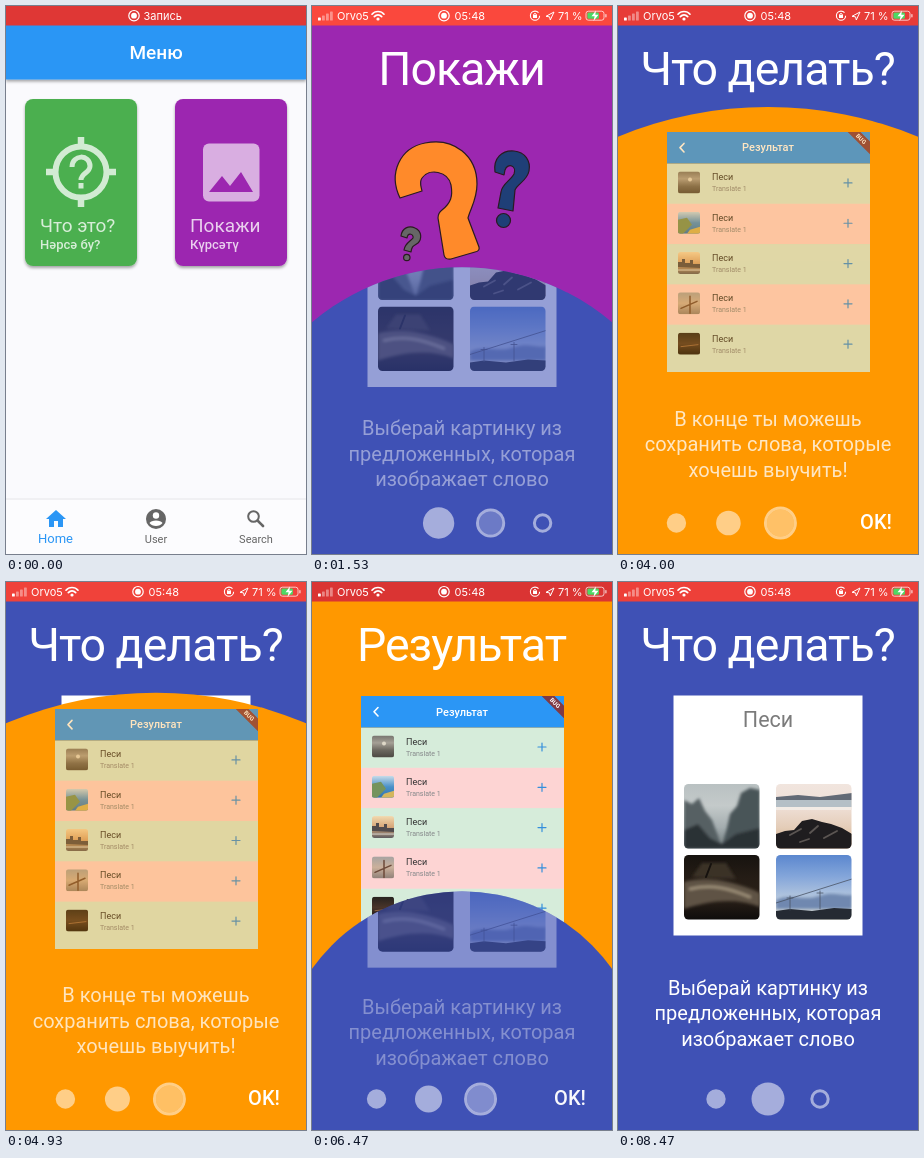
An HTML page for the animation above (8540 ms loop, 300x548 px).

```html
<!DOCTYPE html>
<html lang="ru">
<head>
<meta charset="utf-8">
<title>Меню</title>
<style>
html, body { margin: 0; width: 100%; height: 100%; overflow: hidden; background: #fafafd; }
svg { display: block; width: 300px; height: 548px; }
text { font-family: Roboto, "Noto Sans", sans-serif; }
.mid { text-anchor: middle; }
.status text { font: 11px Inter, "Noto Sans", sans-serif; fill: #fff; }
.title { font-size: 46.5px; letter-spacing: -1px; fill: #fff; text-anchor: middle; }
.body { font-size: 20px; fill: #fff; text-anchor: middle; }
.line { fill: none; stroke-linecap: round; stroke-linejoin: round; }
</style>
</head>
<body>
<svg viewBox="0 0 300 548">
  <defs>
    <clipPath id="reveal"><circle id="hole" cx="150" cy="493.2"/></clipPath>
    <clipPath id="photo"><rect width="75.5" height="64.5" rx="4.5"/></clipPath>
    <clipPath id="thumb"><rect width="22" height="22" rx="2.5"/></clipPath>
    <clipPath id="card"><rect x="49" y="114" width="203" height="240"/></clipPath>
    <filter id="shadow" x="-20%" y="-20%" width="140%" height="150%">
      <feDropShadow dx="0" dy="2" stdDeviation="1.6" flood-opacity=".35"/>
    </filter>
    <filter id="soft"><feGaussianBlur stdDeviation="1.6"/></filter>
  </defs>
  <g id="menu"></g>
  <g id="intro">
    <g id="pages"></g>
    <g id="dots"></g>
    <text id="ok" class="mid" x="258" y="523" font-size="20" font-weight="500" fill="#fff">OK!</text>
  </g>
  <g class="status">
    <rect id="bar" width="300" height="19.5"/>
    <g id="recording"></g>
    <g id="clock"></g>
  </g>
</svg>
<script>
const LOOP = 8540;
const $ = id => document.getElementById(id);

const rect = (x, y, w, h, fill, extra = '') =>
  `<rect x="${x}" y="${y}" width="${w}" height="${h}" fill="${fill}" ${extra}/>`;
const circle = (x, y, r, fill, extra = '') =>
  `<circle cx="${x}" cy="${y}" r="${r}" fill="${fill}" ${extra}/>`;
const shape = (d, fill, extra = '') => `<path d="${d}" fill="${fill}" ${extra}/>`;
const line = (d, color, width, extra = '') =>
  `<path class="line" d="${d}" stroke="${color}" stroke-width="${width}" ${extra}/>`;
const text = (x, y, size, fill, str, extra = '') =>
  `<text x="${x}" y="${y}" font-size="${size}" fill="${fill}" ${extra}>${str}</text>`;
const soft = art => `<g filter="url(#soft)">${art}</g>`;

let gradients = 0;
// Vertical gradient box, colours spread evenly
function sky(w, h, ...colors) {
  const id = 'sky' + gradients++;
  const stops = colors.map((c, i) =>
    `<stop offset="${i / (colors.length - 1)}" stop-color="${c}"/>`).join('');
  return `<linearGradient id="${id}" x2="0" y2="1">${stops}</linearGradient>` +
    rect(0, 0, w, h, `url(#${id})`);
}
const framed = (clip, x, y, art) =>
  `<g transform="translate(${x} ${y})" clip-path="url(#${clip})">${art}</g>`;

// Menu screen
function drawMenu() {
  const pale = 'rgba(255,255,255,.78)';
  const tile = (x, color, top, sub) =>
    rect(x, 93, 112, 167, color, 'rx="8" filter="url(#shadow)"') +
    text(x + 15, 226, 19, pale, top) +
    text(x + 15, 243, 13, pale, sub, 'font-weight="500"');
  const mint = '#d2ebd3';
  const target = circle(75, 166, 25.5, 'none', `stroke="${mint}" stroke-width="6"`) +
    shape('M75 131V142M75 190V201M40 166H51M99 166H110', 'none', `stroke="${mint}" stroke-width="6.5"`) +
    shape('M66 161C66 148 84 148 84 160C84 167 75 167 75 174', 'none', `stroke="${mint}" stroke-width="5"`) +
    rect(72.5, 177, 5, 5.5, mint);
  const picture = rect(197, 137.5, 56.5, 58, '#d9aee1', 'rx="6"') +
    shape('M203 186L216 170L224 180L235 166L247 186Z', '#9c27b0');
  const grey = '#666';
  return rect(0, 0, 300, 548, '#fafafd') +
    rect(0, 10, 300, 63.5, '#2b96f5', 'filter="url(#shadow)"') +
    text(150, 53, 19, '#fff', 'Меню', 'class="mid" font-weight="500"') +
    tile(19, '#4caf50', 'Что это?', 'Нәрсә бу?') + target +
    tile(169, '#9c27b0', 'Покажи', 'Күрсәтү') + picture +
    rect(0, 492, 300, 2, '#f0f0f3') + rect(0, 494, 300, 54, '#fcfcfe') +
    shape('M50 504L40 513H43V521H48V515H52V521H57V513H60Z', '#2b96f5') +
    text(49.5, 537, 13, '#2b96f5', 'Home', 'class="mid"') +
    circle(150, 513, 10, grey) + circle(150, 509.5, 3.2, '#fff') +
    shape('M143.5 517C145 513.5 155 513.5 156.5 517C154 521 146 521 143.5 517Z', '#fff') +
    text(150, 537, 11, grey, 'User', 'class="mid"') +
    circle(247.5, 510.5, 5.3, 'none', `stroke="${grey}" stroke-width="2"`) +
    line('M252 515L257 520', grey, 2.6) +
    text(250, 537, 11, grey, 'Search', 'class="mid"');
}

// Intro pictures
function marks() {
  const mark = (d, x, y, r, color) => {
    const edge = 'stroke="#2a1a20" stroke-width="1.2" stroke-linejoin="round"';
    return shape(d, color, edge) + circle(x, y, r, color, edge);
  };
  return mark('M88 192C76 167 88 142 113 137C142 131 165 150 165 178C165 194 158 203 156 212' +
      'L167 241Q168 245 163 246L139 253Q133 254 132 249L126 212Q126 207 130 204' +
      'C139 197 141 190 139 179C136 165 117 162 110 172C107 176 109 180 110 185Z',
      153, 281, 15, '#ff8a2a') +
    mark('M183 166C181 152 190 144 202 145C213 146 219 155 217 165C215 175 205 178 203 184' +
      'L201 205L186 202L189 186C190 178 199 174 202 168C205 160 196 156 193 164L192 169Z',
      191.5, 214.5, 7, '#1f3f77') +
    mark('M89 230C90 222 97 219 103 222C110 225 110 233 106 237C102 240 100 239 99 246' +
      'L92 244C93 237 99 235 101 232C102 228 96 226 95 232Z',
      94.8, 251.5, 3.2, '#666');
}

function quiz() {
  const w = 76, h = 65;
  const fog = sky(w, h, '#b9c1c2', '#c4caca', '#a4adaf', '#6d777a') +
    soft(shape('M0 16L8 20L15 14L21 27L28 36L34 52L38 65H0Z', '#566064') +
      shape('M76 6L66 4L57 9L53 22L46 30L43 44L37 65H76Z', '#4a5458') +
      shape('M0 46L14 40L26 54L38 60L52 50L76 44V65H0Z', '#2b3236'));
  const beach = sky(w, h, '#f1e5de', '#efe0d8', '#e4cdb8', '#d3ad8c') +
    shape('M0 13L22 11L44 13L76 9V16H0Z', '#626a76') +
    rect(0, 16, w, 7, '#b4bfc6') + rect(0, 23, w, 3, '#f2ebe5') +
    shape('M0 50L9 47L18 46L26 37L36 35L46 38L55 40L66 44L76 50V65H0Z', '#1f1d1f') +
    line('M14 51L25 45M34 49L42 42M48 54L61 47M24 58L33 55', '#5b5552', 1.8);
  const car = sky(w, h, '#17130f', '#241c15', '#2a2018', '#0e0c0b') +
    soft(shape('M0 27C20 21 48 25 76 38V52C52 42 24 46 0 54Z', '#5e5244') +
      shape('M8 22L18 8H42L52 24Z', '#3a3027') + line('M6 34C28 29 44 33 66 42', '#a3947d', 2.5)) +
    line('M22 22L27 9', '#15110e', 2);
  const dusk = sky(w, h, '#5b87cf', '#84a6da', '#b5c7de', '#dcd8c8') +
    soft(shape('M0 45C15 38 28 46 43 41S64 41 76 40V54H0Z', '#7088b0')) +
    shape('M0 56L14 54L36 56L58 53L76 54V65H0Z', '#252a33') +
    line('M14 55V41M44 54V36M11 43H17M41 38H47M0 48L76 24', '#4a5365', .8);
  return rect(55.5, 113.5, 189, 240, '#fff') +
    text(150, 144.5, 21.5, '#7b7b7b', 'Песи', 'class="mid"') +
    framed('photo', 66, 202, fog) + framed('photo', 158, 202, beach) +
    framed('photo', 66, 273, car) + framed('photo', 158, 273, dusk);
}

function results() {
  const thumbs = [
    sky(22, 22, '#77756f', '#a5a096', '#6b675f', '#4b4842') + circle(12, 8, 2, '#ded8c8'),
    sky(22, 22, '#c7dce9', '#4a91c9', '#2f73ad') + shape('M0 8L9 6L14 13L5 22H0Z', '#75935d') + shape('M22 15L12 18L9 22H22Z', '#d4b65d'),
    sky(22, 22, '#f2d8ae', '#d6a678', '#5d5c61') + shape('M0 15V10H4V7H7V11H12V8H15V12H22V16Z', '#514b4d') + rect(0, 17, 22, 2, '#b4aaa0'),
    sky(22, 22, '#a6a3a2', '#cbb09b', '#8f8078') + line('M3 16L19 9M12 4V21', '#6d4a3a', 1.5),
    sky(22, 22, '#26221f', '#4a3529', '#171414') + line('M3 14L20 12', '#906444', 1)
  ];
  const rows = thumbs.map((art, i) => {
    const y = 145.5 + 40.3 * i;
    return rect(49, y, 203, 49, i % 2 ? '#fdd4d3' : '#d6ecda') +
      framed('thumb', 60, y + 8, art) +
      text(94, y + 17, 9, '#333', 'Песи') +
      text(94, y + 28, 7, '#85888a', 'Translate 1') +
      line(`M226 ${y + 19.5}H234M230 ${y + 15.5}V${y + 23.5}`, '#348fdc', 1.2);
  }).join('');
  return `<g clip-path="url(#card)">${rows + rect(49, 114, 203, 31.5, '#2b96f5') +
    line('M66 125.5L62 129.7L66 134', '#fff', 1.6) +
    text(150, 133.5, 11, '#fff', 'Результат', 'class="mid" font-weight="500"') +
    line('M228 106L260 138', '#803a45', 9) +
    text(0, 2, 6, '#fff', 'BUG', 'class="mid" font-weight="700" transform="translate(243 121) rotate(45)"')}</g>`;
}

const PAGES = [
  { color: '#9c27b0', title: 'Покажи', art: marks(), body: [] },
  { color: '#3f51b5', title: 'Что делать?', art: quiz(),
    body: ['Выберай картинку из', 'предложенных, которая', 'изображает слово'] },
  { color: '#ff9800', title: 'Результат', art: results(),
    body: ['В конце ты можешь', 'сохранить слова, которые', 'хочешь выучить!'] }
];

const svgGroup = html => {
  const g = document.createElementNS('http://www.w3.org/2000/svg', 'g');
  g.innerHTML = html;
  return g;
};
const pageEls = PAGES.map(p => svgGroup(rect(0, 0, 300, 548, p.color) +
  `<g><text class="title" x="149.5" y="78.5">${p.title}</text></g><g>${p.art}</g><g>` +
  p.body.map((s, i) => `<text class="body" x="150" y="${412.7 + 25.5 * i}">${s}</text>`).join('') + '</g>'));
$('pages').append(...pageEls);
$('menu').innerHTML = drawMenu();

// Status bar
const rec = x => circle(x, 9.7, 5.2, 'none', 'stroke="#fff" stroke-width="1.2"') + circle(x, 9.7, 2.9, '#fff');
$('recording').innerHTML = rec(128) + '<text x="137.5" y="13.7">Запись</text>';
$('clock').innerHTML =
  [0, 1, 2, 3].map(i => rect(6 + i * 4, 11.5 - i * 2, 2.8, 3 + i * 2, '#fff', `rx=".6" opacity="${i ? .4 : 1}"`)).join('') +
  '<text x="25" y="13.7">Orvo5</text>' +
  line('M60 8.2C63 4.6 69 4.6 72 8.2M62.3 10.6C64.5 8.2 67.5 8.2 69.7 10.6', '#fff', 1.7) +
  circle(66, 13, 1.6, '#fff') + rec(132) + '<text x="142.5" y="13.7">05:48</text>' +
  circle(223, 9.7, 4.6, 'none', 'stroke="#fff" stroke-width="1.1" stroke-dasharray="25 4"') +
  rect(221, 8.8, 4, 3.2, '#fff') + line('M221.8 9V8Q223 6.4 224.2 8V9', '#fff', .8) +
  shape('M234 10.3L242 6L238.3 14L237.6 10.9Z', 'none', 'stroke="#fff" stroke-width="1"') +
  '<text x="246" y="13.7">71 %</text>' +
  rect(274, 5.2, 18, 9, 'none', 'rx="2.4" stroke="#fff" stroke-opacity=".7"') +
  rect(275.4, 6.6, 11.5, 6.2, '#4cd964', 'rx="1.2"') +
  rect(293.2, 8, 1.4, 3.4, '#fff', 'rx=".7" opacity=".7"') +
  shape('M284 4.5L279.5 10.3H282.6L281.5 15L286.5 8.8H283.3Z', '#fff');

// Piecewise linear track of [time, value]
function track(keys, t) {
  if (t <= keys[0][0]) return keys[0][1];
  for (let i = 1; i < keys.length; i++) {
    const [t0, v0] = keys[i - 1], [t1, v1] = keys[i];
    if (t <= t1) return v0 + (v1 - v0) * (t - t0) / (t1 - t0);
  }
  return keys[keys.length - 1][1];
}

const SWIPES = [
  { from: 0, to: 1, keys: [[1130, 0], [1330, .2], [1530, .449], [1750, .66], [2020, 1]] },
  { from: 1, to: 2, keys: [[3150, 0], [3420, .32], [3700, .66], [4000, .761], [4400, .77], [4930, .742], [5080, .74], [5300, 1]] },
  { from: 2, to: 1, keys: [[5800, 0], [6130, .22], [6470, .356], [6750, .55], [7110, 1]] }
];
const PULSE = [[0, .15], [700, .6], [1530, 1], [2730, .85], [4000, .4], [4930, .7], [6470, 0], [8470, .6]];
const SLIDE = [300, 700];
const FULL = Math.hypot(150, 493.2);

function placePage(el, p) {
  const [, title, art, body] = el.children;
  [[title, 50], [art, 50], [body, 30]].forEach(([g, shift]) => {
    g.setAttribute('transform', `translate(0 ${shift * (1 - p)})`);
    g.setAttribute('opacity', p);
  });
}

function drawDots(pos) {
  const ring = 3;
  $('dots').innerHTML = [0, 1, 2].map(i => {
    const active = Math.max(0, 1 - Math.abs(i - pos));
    const r = 9.7 + 6.8 * Math.min(1, active * 1.6);
    const x = 150 + 52 * (i - pos);
    if (i <= pos) return circle(x, 517, r, '#fff', 'fill-opacity=".53"');
    return circle(x, 517, r - ring, '#fff', `fill-opacity="${.53 * active}"`) +
      circle(x, 517, r - ring / 2, 'none', `stroke="#fff" stroke-opacity=".53" stroke-width="${ring}"`);
  }).join('');
}

function render(t) {
  const swipe = SWIPES.filter(s => t >= s.keys[0][0]).pop() || SWIPES[0];
  const { from, to } = swipe;
  const p = track(swipe.keys, t);
  const pos = from + (to - from) * p;

  pageEls.forEach((el, i) => {
    el.style.display = i === from || i === to ? '' : 'none';
    el.removeAttribute('clip-path');
  });
  const top = pageEls[to];
  if (top.parentNode.lastChild !== top) top.parentNode.append(top);
  top.setAttribute('clip-path', 'url(#reveal)');
  $('hole').setAttribute('r', p < 1 ? FULL * p : 600);
  placePage(pageEls[from], 1);
  placePage(top, p);
  drawDots(pos);
  $('ok').setAttribute('opacity', Math.min(1, Math.max(0, (pos - 1) * 1.5)));

  const k = Math.min(1, Math.max(0, (t - SLIDE[0]) / (SLIDE[1] - SLIDE[0])));
  const slide = 1 - (1 - k) ** 3;
  $('intro').setAttribute('transform', `translate(${300 * (1 - slide)} 0)`);
  $('menu').setAttribute('transform', `translate(${-100 * slide} 0)`);
  $('menu').style.display = k < 1 ? '' : 'none';

  const glow = track(PULSE, t);
  $('bar').setAttribute('fill', `rgb(${218 + 32 * glow} ${52 + 20 * glow} ${51 + 10 * glow})`);
  $('recording').style.display = t < 650 ? '' : 'none';
  $('clock').style.display = t < 650 ? 'none' : '';
}

const start = performance.now();
function tick() {
  render((performance.now() - start) % LOOP);
  requestAnimationFrame(tick);
}
tick();
</script>
</body>
</html>
```
